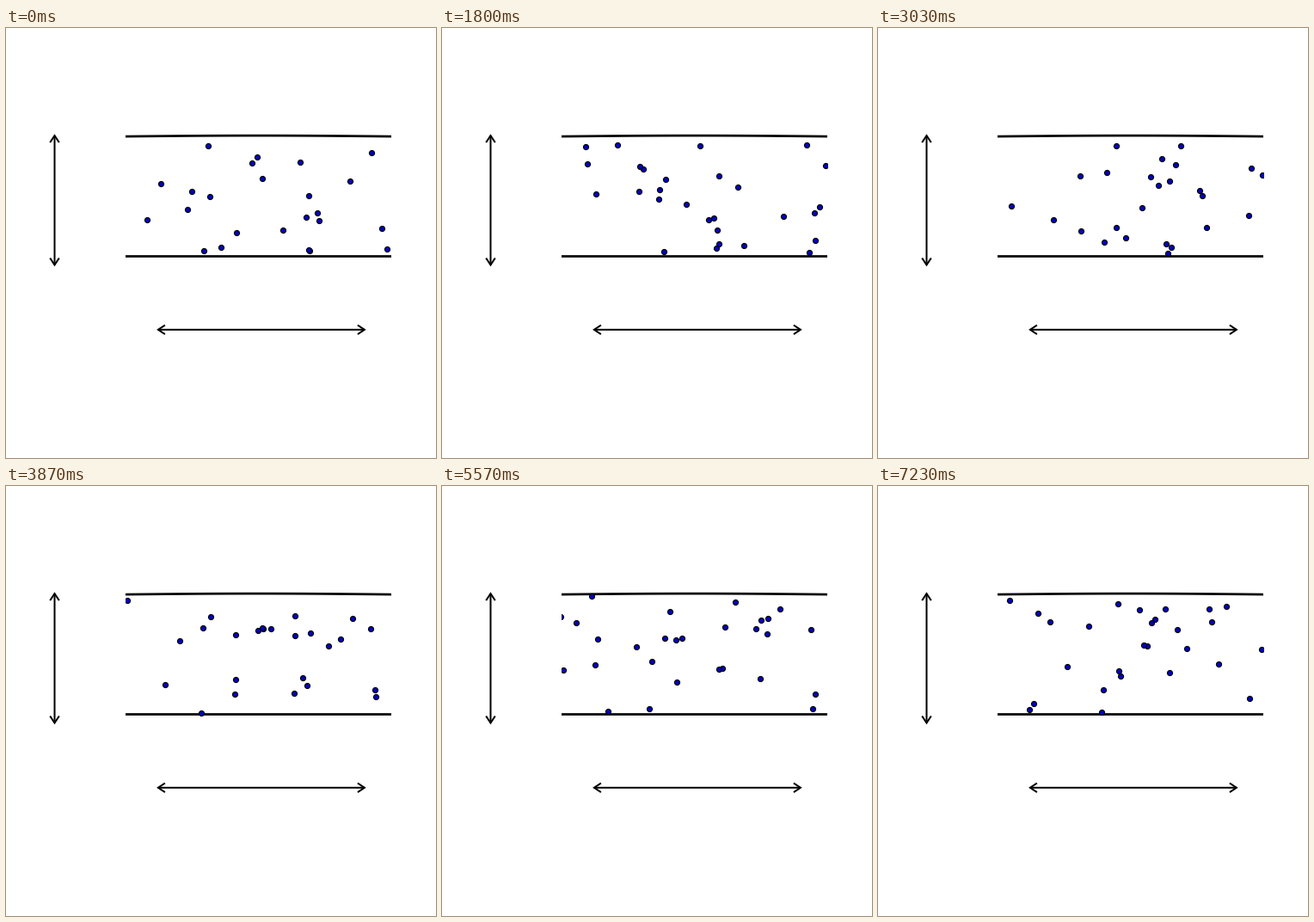
Write a matplotlib script that moves like this. It is 500 by 500 pixels and loops after 7.26 s.

```python
import numpy as np
import matplotlib.pyplot as plt
from matplotlib.animation import FuncAnimation
from matplotlib.patches import Rectangle

SIZE, DPI = 500, 100
PX = 72 / DPI                      # points per pixel
FRAMES, INTERVAL = 242, 30
STEPS = 131                        # distinct poses in one loop
COUNT, SPEED = 40, 45              # particles, px per second on each axis
LEFT, RIGHT = 138.5, 447.5         # visible part of the channel
TOP, BOTTOM = 125, 265
X0, WIDTH = 132, 440               # periodic span, partly out of view
Y0, HEIGHT = 126, 138              # walls reached by particle centres

rng = np.random.default_rng(4)
start = rng.uniform(0, (WIDTH, HEIGHT), (COUNT, 2))
velocity = rng.normal(0, SPEED, (COUNT, 2))


def positions(t):
    """Straight flight: wrap along the channel, reflect at its walls."""
    x, y = (start + velocity * t).T
    y = y % (2 * HEIGHT)
    return X0 + x % WIDTH, Y0 + np.minimum(y, 2 * HEIGHT - y)


fig = plt.figure(figsize=(SIZE / DPI, SIZE / DPI), dpi=DPI, facecolor="white")
ax = fig.add_axes([0, 0, 1, 1])
ax.set_xlim(-0.5, SIZE - 0.5)
ax.set_ylim(SIZE - 0.5, -0.5)
ax.axis("off")


def stroke(x, y, width):
    ax.plot(x, y, color="black", lw=width * PX, solid_capstyle="butt",
            solid_joinstyle="miter", snap=False)


def double_arrow(a, b, across, upright=False):
    def draw(u, v):
        stroke(*((v, u) if upright else (u, v)), 2)

    draw([a + 1, b - 1], [across, across])
    for tip, side in ((a, 1), (b, -1)):
        draw([tip + 9 * side, tip + side, tip + 9 * side],
             [across - 5.3, across, across + 5.3])


wall = np.linspace(LEFT, RIGHT, 60)
bow = np.sin(np.linspace(0, np.pi, 60))
stroke(wall, TOP + 0.6 - bow, 2.7)
stroke([LEFT, RIGHT], [BOTTOM, BOTTOM], 2.7)
double_arrow(123.6, 276, 56, upright=True)
double_arrow(175.4, 417.4, 350.3)

dots, = ax.plot([], [], "o", ms=6 * PX, mew=1.2 * PX, mfc="#0000c8",
                mec="black", snap=False, zorder=5)
dots.set_clip_path(Rectangle((LEFT, 0), RIGHT - LEFT, SIZE,
                             transform=ax.transData))


def update(i):
    step = (i * STEPS + FRAMES // 2) // FRAMES
    dots.set_data(*positions(step / STEPS * FRAMES * INTERVAL / 1000))
    return dots,


anim = FuncAnimation(fig, update, frames=FRAMES, interval=INTERVAL,
                     init_func=lambda: update(0), repeat=True,
                     repeat_delay=0, blit=False)
plt.show()
```
